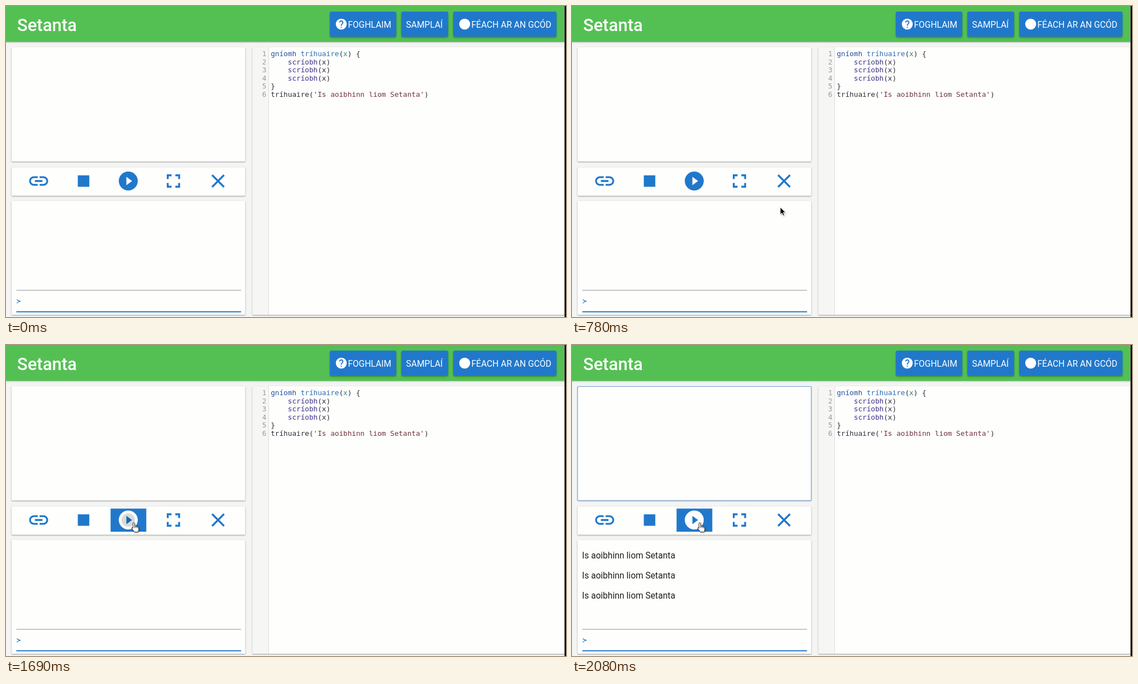
Recreate the animation shown at these times as an HTML page. Size 1003 px wide and 558 px high, loop 3.12 s.

```html
<!DOCTYPE html>
<html lang="ga">
<head>
<meta charset="utf-8">
<title>Setanta</title>
<style>
  html, body { margin: 0; width: 100%; height: 100%; overflow: hidden; background: #f4f4f3; }
  svg { display: block; width: 1003px; height: 558px; }
  text { font-family: Roboto, sans-serif; font-size: 15.6px; white-space: pre; }
  .code text { font-family: "DejaVu Sans Mono", monospace; font-size: 12.7px; fill: #2b2d36; }
  .code .num { fill: #9a9a9a; text-anchor: end; }
  .kw { fill: #24509f; }
  .def { fill: #2b6cb0; }
  .arg { fill: #348270; }
  .fn { fill: #3b3188; }
  .str { fill: #6f343b; }
  .blue { fill: #2178cb; }
  .card { fill: #fefefd; filter: drop-shadow(0 1px 1px rgba(0, 0, 0, .38)); }
  .btn { fill: #2178cb; filter: drop-shadow(0 2px 1.5px rgba(0, 0, 0, .3)); }
  .white { fill: #fff; }
</style>
</head>
<body>
<svg viewBox="0 0 1003 558" xmlns="http://www.w3.org/2000/svg">
  <rect width="1003" height="558" fill="#f4f4f3"/>
  <rect width="1000" height="64.5" fill="#54c053" style="filter:drop-shadow(0 1px 1px rgba(0,0,0,.2))"/>
  <text x="20" y="44.5" class="white" style="font-size:31px;font-weight:500">Setanta</text>

  <rect class="btn" x="580" y="10" width="119" height="45" rx="3"/>
  <rect class="btn" x="708" y="10" width="84" height="45" rx="3"/>
  <rect class="btn" x="801" y="10" width="185" height="45" rx="3"/>
  <g class="white">
    <circle cx="600.5" cy="32.5" r="9.8"/>
    <circle cx="821.5" cy="32.5" r="9.8"/>
    <text x="612.5" y="39">FOGHLAIM</text>
    <text x="716.5" y="39">SAMPLAÍ</text>
    <text x="833.5" y="39">FÉACH AR AN GCÓD</text>
  </g>
  <path class="blue" transform="translate(588.8 20.8) scale(.976)" d="M13 19h-2v-2h2zM15.07 11.25l-.9.92C13.45 12.9 13 13.5 13 15h-2v-.5c0-1.1.45-2.1 1.17-2.83l1.24-1.26c.37-.36.59-.86.59-1.41 0-1.1-.9-2-2-2s-2 .9-2 2H8c0-2.21 1.79-4 4-4s4 1.79 4 4c0 .88-.36 1.68-.93 2.25z"/>

  <rect class="card" x="10" y="74" width="418.5" height="205" rx="1"/>
  <rect class="card" x="10" y="289.5" width="418.5" height="51" rx="1"/>
  <rect class="card" x="10" y="350" width="418.5" height="204" rx="1"/>
  <rect class="card" x="441.5" y="74" width="562" height="480" rx="1"/>
  <rect id="focus" x="10" y="74.5" width="418.5" height="204.5" rx="1" fill="none" stroke="#75a7d9" stroke-width="1.2"/>

  <rect x="441.5" y="74" width="29" height="480" fill="#f6f6f5"/>
  <rect x="470" y="74" width="1" height="480" fill="#dedede"/>
  <g class="code" id="code"></g>

  <rect id="hover" class="blue" x="187.3" y="293.5" width="64" height="41.5"/>
  <g class="blue">
    <path transform="translate(38.1 293.6) scale(1.7)" d="M3.9 12c0-1.71 1.39-3.1 3.1-3.1h4V7H7c-2.76 0-5 2.24-5 5s2.24 5 5 5h4v-1.9H7c-1.71 0-3.1-1.39-3.1-3.1zM8 13h8v-2H8v2zm9-6h-4v1.9h4c1.71 0 3.1 1.39 3.1 3.1s-1.39 3.1-3.1 3.1h-4V17h4c2.76 0 5-2.24 5-5s-2.24-5-5-5z"/>
    <rect x="128.6" y="303.8" width="20.6" height="20.6"/>
    <path transform="translate(279.5 293.6) scale(1.7)" d="M7 14H5v5h5v-2H7v-3zm-2-4h2V7h3V5H5v5zm12 7h-3v2h5v-5h-2v3zM14 5v2h3v3h2V5h-5z"/>
    <path transform="translate(359.4 293.6) scale(1.7)" d="M19 6.41L17.59 5 12 10.59 6.41 5 5 6.41 10.59 12 5 17.59 6.41 19 12 13.41 17.59 19 19 17.59 13.41 12z"/>
  </g>
  <circle id="disc" cx="219" cy="314" r="17"/>
  <path id="tri" d="M215.6 306.4v15.2l10.2-7.6z"/>
  <clipPath id="clip"><rect x="187.3" y="293.5" width="64" height="41.5"/></clipPath>
  <g clip-path="url(#clip)"><circle id="ripple" cx="219" cy="314"/></g>

  <g id="output" fill="#1d1d1f"></g>
  <rect x="18.5" y="509.5" width="402.5" height="1.2" fill="#a3a3a3"/>
  <path d="M19.5 526.7Q21.5 529.5 26.3 530Q21.5 530.5 19.5 533.4" fill="none" stroke="#2178cb" stroke-width="1.2"/>
  <rect class="blue" x="18.5" y="547.6" width="402.5" height="2"/>
  <rect x="1000.4" width="2.6" height="558" fill="#050505"/>

  <g style="filter:drop-shadow(1px 1px 1px rgba(0,0,0,.3))">
    <path id="arrow" d="M0 0V13.2L3 10.5 5 15.2 7.3 14.2 5.3 9.6H9.4z" fill="#0c0c0c" stroke="#fff" stroke-width=".9"/>
    <path id="hand" d="M2.6 10.2V1.5Q2.8 0 4.1 0 5.4 0 5.6 1.5V6.2Q7.3 5.4 8.2 6.7 9.8 6 10.6 7.4 12.8 6.8 13 9V12.6Q12.8 14.7 11.7 16.8H4.9Q3.6 14.3.7 10.8-.3 9.1 1 8.7 1.9 8.7 2.6 10.2zM5.7 6.4V9.2M8.3 6.8V9.5M10.7 7.5V9.8" fill="#fff" stroke="#272727" stroke-width="1"/>
  </g>
</svg>
<script>
const LOOP = 3120, STEP = 130;
const $ = id => document.getElementById(id);
const span = (cls, s) => `<tspan class="${cls}">${s}</tspan>`;
const show = (id, on) => $(id).setAttribute("visibility", on ? "visible" : "hidden");
const place = (id, p) => $(id).setAttribute("transform", `translate(${p})`);

const phrase = "Is aoibhinn liom Setanta";
const call = "    " + span("fn", "scríobh") + "(x)";
const lines = [
  span("kw", "gníomh") + " " + span("def", "tríhuaire") + "(" + span("arg", "x") + ") {",
  call, call, call,
  "}",
  "tríhuaire(" + span("str", `'${phrase}'`) + ")"
];
$("code").innerHTML = lines.map((line, i) => {
  const y = 90 + i * 14.55;
  return `<text class="num" x="466.3" y="${y}">${i + 1}</text><text x="474.2" y="${y}">${line}</text>`;
}).join("");
$("output").innerHTML = [0, 1, 2].map(i => `<text x="18" y="${382.5 + i * 36}">${phrase}</text>`).join("");

// pointer stops, one per step from 650 ms
const arrowPath = [[530.5, 407], [373, 361], [248.2, 328.5]];
const handPath = [[226, 319.5], [224.8, 318.8]];
// ripple radius and opacity, one pair per step from 1690 ms
const ripples = [[12, .14], [40, .12], [40, .05]];

function draw(ms) {
  const n = Math.floor(ms / STEP);
  const move = n - 5, press = n - 13;
  const hover = move >= 2, done = press >= 1;

  show("arrow", move >= 0 && move < 3);
  show("hand", move >= 3);
  if (move >= 0 && move < 3) place("arrow", arrowPath[move]);
  if (move >= 3) place("hand", handPath[Math.min(move - 3, 1)]);

  show("hover", hover);
  $("disc").setAttribute("fill", hover ? "#fefefe" : "#2178cb");
  $("tri").setAttribute("fill", hover ? "#2178cb" : "#fefefe");

  const [r, alpha] = ripples[press] || [0, 0];
  $("ripple").setAttribute("r", r);
  $("ripple").setAttribute("opacity", alpha);

  show("focus", done);
  show("output", done);
}

const start = performance.now();
function tick() {
  draw((performance.now() - start) % LOOP);
  requestAnimationFrame(tick);
}
tick();
</script>
</body>
</html>
```
